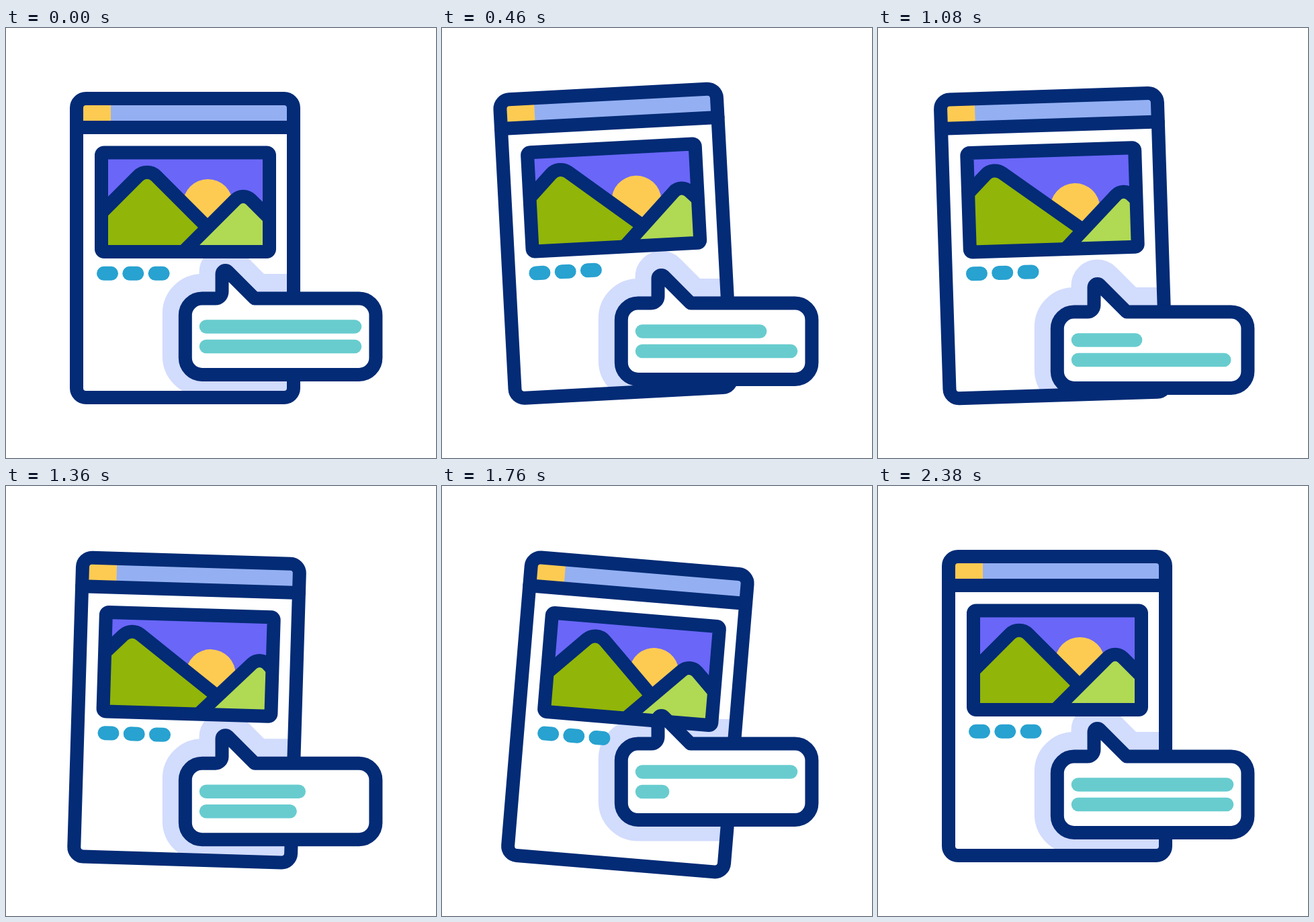
Animation of 640x640 px, one loop 2.4 s. Source, as an HTML page with a canvas:

```html
<!DOCTYPE html>
<html lang="en">
<head>
<meta charset="utf-8">
<title>Page and comment</title>
<style>
  html, body { margin: 0; height: 100%; overflow: hidden; background: #fff; }
  canvas { display: block; width: 640px; height: 640px; }
</style>
</head>
<body>
<canvas id="stage" width="640" height="640"></canvas>
<script>
const LOOP = 2400;
const NAVY = '#032b76', PALE = '#d2dcfd', YELLOW = '#fecb52', SKY = '#6a66f8', TEAL = '#68cccf';
const ctx = document.getElementById('stage').getContext('2d');

// Sine ease from 0 to 1 between two times.
function ramp(t, from, to) {
  const p = Math.min(1, Math.max(0, (t - from) / (to - from)));
  return (1 - Math.cos(Math.PI * p)) / 2;
}

// Each motion is a sum of ramps that cancels out over the loop.
const tilt = t => -5 * ramp(t, 120, 720) + 10 * ramp(t, 625, 1825) - 5 * ramp(t, 1680, 2340);
const bob = t => 20 * ramp(t, 200, 850) - 40 * ramp(t, 1190, 1707) + 20 * ramp(t, 1707, 2072);
const spread = t => ramp(t, 0, 690) - ramp(t, 1360, 1750);
const sunDrop = t => 11 * (ramp(t, 0, 1250) - ramp(t, 1360, 1750));
const lineA = t => 519 - 136 * (ramp(t, 110, 1000) - ramp(t, 1070, 1750));
const lineB = t => 519 - 195 * (ramp(t, 1020, 1707) - ramp(t, 1707, 2287));

function fillBox(x, y, w, h, color) {
  ctx.fillStyle = color;
  ctx.fillRect(x, y, w, h);
}

function box(x, y, w, h, r) {
  ctx.beginPath();
  ctx.roundRect(x, y, w, h, r);
}

function fill(color) {
  ctx.fillStyle = color;
  ctx.fill();
}

function stroke(color, width) {
  ctx.strokeStyle = color;
  ctx.lineWidth = width;
  ctx.stroke();
}

function line(x0, x1, y, color, width) {
  ctx.beginPath();
  ctx.moveTo(x0, y);
  ctx.lineTo(x1, y);
  stroke(color, width);
}

// The left flank always falls at 45 degrees; the right one runs through (rx, ry).
function mountain(px, py, rx, ry, r, color) {
  const base = 400;
  ctx.beginPath();
  ctx.moveTo(px - (base - py), base);
  ctx.arcTo(px, py, rx, ry, r);
  ctx.lineTo(px + (rx - px) * (base - py) / (ry - py), base);
  ctx.closePath();
  fill(color);
  stroke(NAVY, 20);
}

function bubblePath() {
  const left = 266.8, right = 550.4, top = 402.5, bottom = 516, r = 25;
  ctx.beginPath();
  ctx.moveTo(left + r, top);
  ctx.arcTo(321.5, top, 321.5, 392, 10);
  ctx.lineTo(321.5, 366);
  ctx.arc(326.5, 366, 5, Math.PI, Math.PI * 1.75);
  ctx.lineTo(370, top);
  ctx.arcTo(right, top, right, bottom, r);
  ctx.arcTo(right, bottom, left, bottom, r);
  ctx.arcTo(left, bottom, left, top, r);
  ctx.arcTo(left, top, left + r, top, r);
  ctx.closePath();
}

function picture(t) {
  const s = spread(t);
  const frame = () => box(142, 185.5, 250, 147.5, 4);
  ctx.save();
  frame();
  ctx.clip();
  fill(SKY);
  ctx.beginPath();
  ctx.arc(300.5, 262 + sunDrop(t), 37, 0, Math.PI * 2);
  fill(YELLOW);
  mountain(210 - 29.5 * s, 207, 300, 297, 19, '#91b508');
  mountain(353 + 20 * s, 244, 383 + 20 * s, 274, 16, '#b0d954');
  ctx.restore();
  frame();
  stroke(NAVY, 20);
}

function page(t) {
  const s = spread(t);
  const sheet = () => box(105, 105, 323, 445, 14);
  ctx.save();
  ctx.translate(115 - 1.2 * s, 453 + 1.4 * s);
  ctx.rotate(tilt(t) * Math.PI / 180);
  ctx.translate(-115, -453);
  sheet();
  fill('#fff');

  // The halo stays level with the bubble but is cut by the tilted page.
  ctx.save();
  ctx.clip();
  ctx.setTransform(1, 0, 0, 1, 0, bob(t) - 2.5);
  bubblePath();
  stroke(PALE, 68);
  ctx.restore();

  fillBox(110, 110, 313, 38, '#94b0f2');
  fillBox(110, 110, 46, 38, YELLOW);
  line(105, 428, 148, NAVY, 20);
  sheet();
  stroke(NAVY, 20);
  picture(t);
  for (let i = 0; i < 3; i++) {
    const x = 145.5 + 38.3 * i;
    line(x, x + 11, 365.3, '#28a2d0', 21);
  }
  ctx.restore();
}

function bubble(t) {
  ctx.save();
  ctx.translate(0, bob(t));
  bubblePath();
  fill('#fff');
  stroke(NAVY, 20);
  line(298, lineA(t), 444.5, TEAL, 20.5);
  line(298, lineB(t), 474, TEAL, 20.5);
  ctx.restore();
}

ctx.lineCap = ctx.lineJoin = 'round';
const start = performance.now();
function tick() {
  const t = (performance.now() - start) % LOOP;
  fillBox(0, 0, 640, 640, '#fff');
  page(t);
  bubble(t);
  requestAnimationFrame(tick);
}
tick();
</script>
</body>
</html>
```
